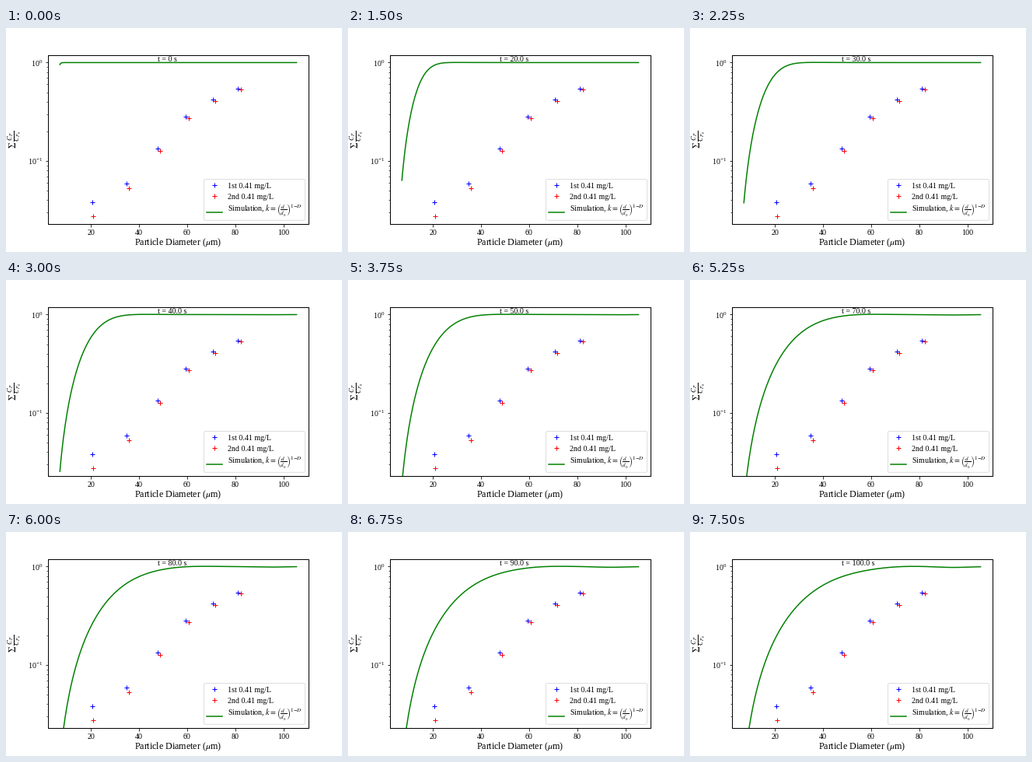
Recreate the animation shown at these times as a matplotlib script. Size 432 by 288 pixels, loop 8 s.

```python
import numpy as np
import matplotlib.pyplot as plt
from matplotlib.animation import FuncAnimation
from matplotlib.lines import Line2D
from matplotlib.patches import FancyBboxPatch

plt.rcParams.update({
    "font.family": "Liberation Serif",
    "mathtext.fontset": "stix",
    "font.size": 10,
    "axes.linewidth": 1,
})

HEIGHT = 288
TICK = 250          # ms per drawn frame
HOLD = 3            # drawn frames per simulated step
FRAMES = 32

# Two measured runs: the second drifts from the first by a fading amount.
n = np.arange(6)
fade = (1 + n) ** -1.6
size1 = 20.6 + 15 * n - 0.84 * n ** 2 + 0.052 * n ** 3
level1 = np.array([0.038, 0.0584, 0.1335, 0.281, 0.419, 0.543])
size2 = size1 + 1.1 - 0.7 * fade
level2 = level1 * 0.72 ** fade

size = np.linspace(7.08, 105.4, 400)


def bell(x, mid, width):
    return np.exp(-((x - mid) / width) ** 2)


def remaining(d, t):
    """Fraction left below diameter d after t seconds."""
    scale = 5.2 + 0.306 * t - 2.93 * np.exp(-t / 6)
    power = 2.48 - 0.0042 * t
    rise = 1 - np.exp(-((d - 3.5) / scale) ** power)
    s = t / 100
    return rise + 0.02 * (s * bell(d, 12 + 60 * s, 13)
                          - s ** 2 * bell(d, 94, 9))


def entry(y, label, drop=3.2, xs=(268,), **style):
    """Legend row in pixels; y is the text baseline from the top."""
    mark_y = HEIGHT - y + drop
    fig.add_artist(Line2D(xs, [mark_y] * len(xs), transform=None, **style))
    fig.text(285.4, HEIGHT - y, label, transform=None)


fig, ax = plt.subplots(figsize=(6, 4), dpi=72)
fig.subplots_adjust(left=0.125, right=0.9, bottom=0.125, top=0.88)

ax.plot(size1, level1, "b+")
ax.plot(size2, level2, "r+")
curve, = ax.plot(size, remaining(size, 0), "g")
clock = ax.text(0.42, 0.96, "", transform=ax.transAxes)

ax.set_yscale("log")
ax.set_xlim(2.15, 110.32)
ax.set_ylim(10 ** -1.641, 10 ** 0.0781)
ax.set_xlabel(r"Particle Diameter ($\mu$m)", fontsize=12, labelpad=1)
ax.set_ylabel(r"$\Sigma\;\frac{C_P}{C_{P_0}}$", fontsize=12, labelpad=5)

fig.add_artist(FancyBboxPatch(
    (254.5, HEIGHT - 247.3), 130, 52.8, transform=None,
    boxstyle="round,pad=0,rounding_size=2",
    fc="white", ec="0.8", lw=0.8, alpha=0.8))
entry(205.5, "1st 0.41 mg/L", marker="+", color="b")
entry(219.5, "2nd 0.41 mg/L", marker="+", color="r")
entry(236.3, r"Simulation, $k=\left(\frac{d}{d_0}\right)^{1{-}D}$",
      drop=-0.7, xs=(258, 278), color="g")


def update(i):
    t = 10.0 * (i // HOLD)
    curve.set_ydata(remaining(size, t))
    clock.set_text(f"t = {t:.1f} s" if t else "t = 0 s")
    return curve, clock


anim = FuncAnimation(fig, update, frames=FRAMES, interval=TICK,
                     repeat=True, repeat_delay=0)
plt.show()
```
